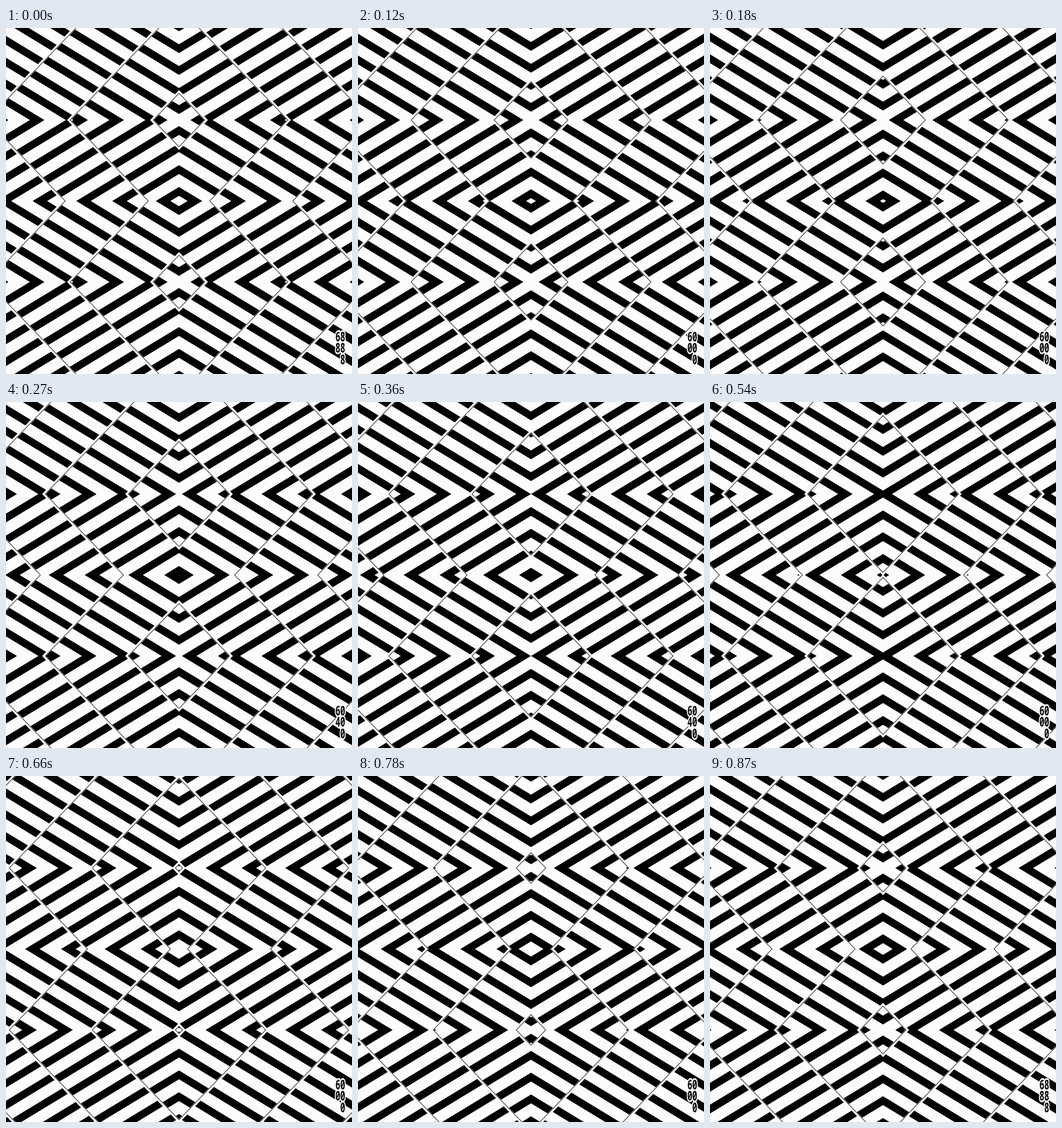
Recreate the animation shown at these times as an HTML page with a canvas. Size 500 by 500 pixels, loop 900 ms.

```html
<!DOCTYPE html>
<html lang="en">
<head>
<meta charset="utf-8">
<title>Mirrored stripes</title>
<style>
html, body { margin: 0; width: 100%; height: 100%; overflow: hidden; background: #fcfcfc; }
canvas { display: block; width: 500px; height: 500px; }
</style>
</head>
<body>
<canvas id="stage" width="500" height="500"></canvas>
<script>
const ctx = document.getElementById('stage').getContext('2d');
const WHITE = '#fcfcfc', BLACK = '#020202';
const LOOP = 900, STEP = 30;
const BAND = 120;    // distance between zigzag lines
const START = 92.7;  // first zigzag line on the mirror axis
const PERIOD = 52;   // horizontal stripe spacing
const THICK = 21;    // horizontal stripe thickness
const JUMP = 11;     // stripe offset from one band to the next
const LEAN = 0.965;  // zigzag run per unit of height
const SLOPE = 1.65;  // stripe run per unit of height
const TOP = -6, END = 140;

// Mirror strips: axis, direction, height
const strips = [[133, -1, 133], [133, 1, 117], [367, -1, 117], [367, 1, 133]];

const digits = [[0, '68888'], [90, '60000'], [240, '60400'], [400, '60906'], [500, '60000'], [840, '68888']];

// Path of a slanted bar from x = a to x = b, running sideways with height
function bar(a, b, run) {
  ctx.beginPath();
  ctx.moveTo(a + run * TOP, TOP);
  ctx.lineTo(b + run * TOP, TOP);
  ctx.lineTo(b + run * END, END);
  ctx.lineTo(a + run * END, END);
  ctx.closePath();
}

function fillBar(a, b, run, color) {
  bar(a, b, run);
  ctx.fillStyle = color;
  ctx.fill();
}

function drawCell(p) {
  for (let k = -3; k <= 2; k++) {
    const left = START + BAND * (k - p);
    const tip = 118.5 + JUMP * k + (PERIOD - JUMP) * p;
    ctx.save();
    bar(left, left + BAND, LEAN);
    ctx.clip();
    for (let n = -7; n <= 9; n++) {
      const x = tip + n * PERIOD;
      fillBar(x - THICK, x, -SLOPE, BLACK);
    }
    ctx.restore();
  }
  for (let k = -3; k <= 2; k++) {
    const x = START + BAND * (k - p);
    fillBar(x - 4.5, x + 1, LEAN, WHITE);
    fillBar(x - 0.6, x + 0.6, LEAN, '#222');
  }
}

function drawDigits(t) {
  const text = digits.filter(d => d[0] <= t).pop()[1];
  ctx.save();
  ctx.scale(0.6, 1);
  ctx.font = 'bold 20px "Noto Sans Mono", monospace';
  ctx.textAlign = 'center';
  ctx.lineJoin = 'round';
  ctx.lineWidth = 5;
  ctx.strokeStyle = WHITE;
  ctx.fillStyle = BLACK;
  const place = (i, draw) => {
    const col = i === 4 ? 1 : i % 2;
    draw.call(ctx, text[i], (479.5 + 7 * col) / 0.6, 452.5 + 16.5 * Math.floor(i / 2));
  };
  for (let i = 0; i < 5; i++) place(i, ctx.strokeText);
  for (let i = 0; i < 5; i++) place(i, ctx.fillText);
  ctx.restore();
}

function draw(t) {
  ctx.fillStyle = WHITE;
  ctx.fillRect(0, 0, 500, 500);
  for (const side of [1, -1]) {
    for (const [axis, dir, height] of strips) {
      ctx.save();
      ctx.translate(side > 0 ? 0 : 500, axis);
      ctx.scale(side, dir);
      ctx.beginPath();
      ctx.rect(0, 0, 250, height);
      ctx.clip();
      drawCell(t / LOOP);
      ctx.restore();
    }
  }
  drawDigits(t);
}

const start = performance.now();
function tick() {
  const t = (performance.now() - start) % LOOP;
  draw(Math.floor(t / STEP) * STEP);
  requestAnimationFrame(tick);
}
tick();
</script>
</body>
</html>
```
